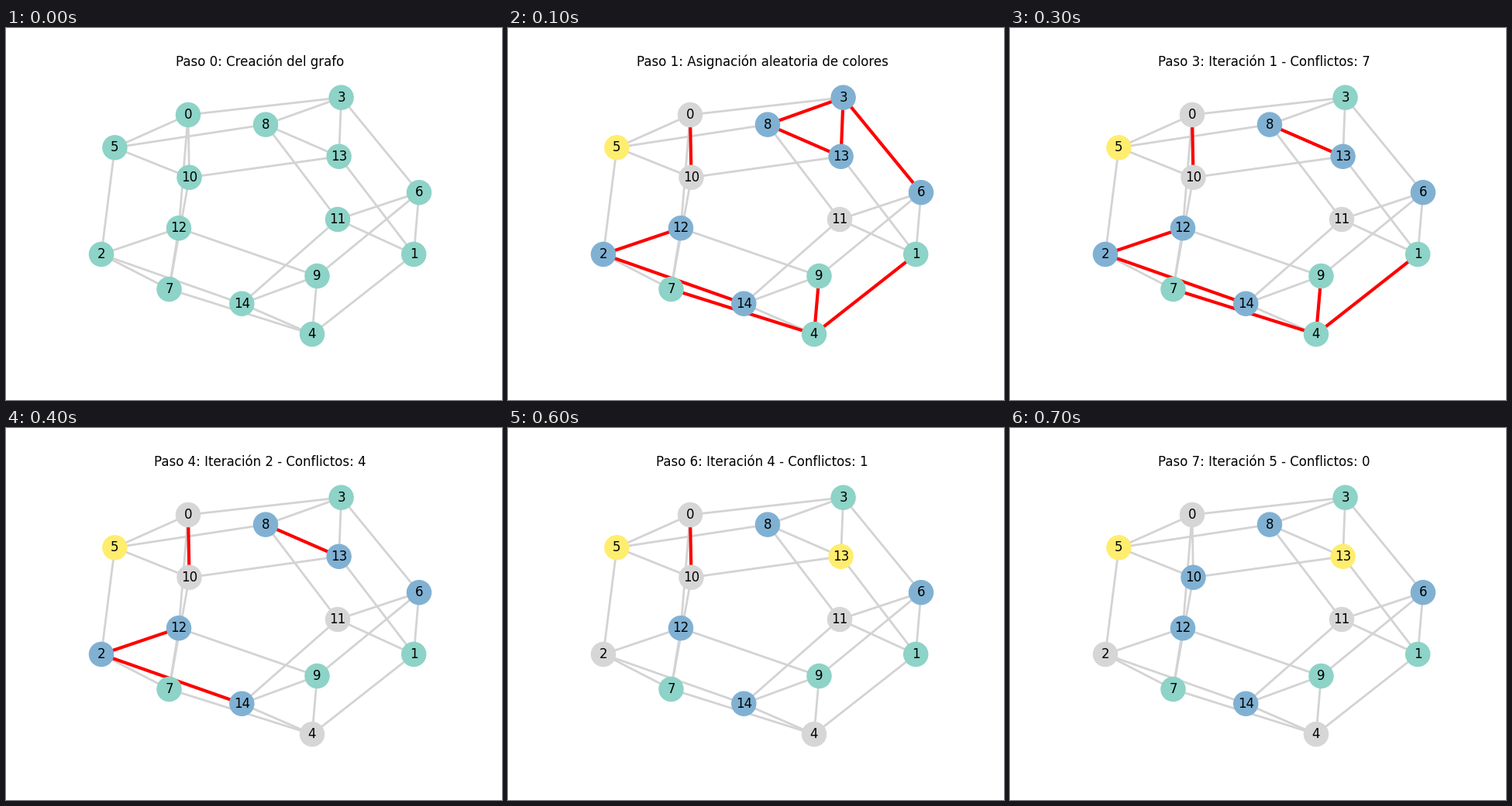
These frames come from a looping animation (640x480 px, 0.8 s). A matplotlib script:

```python
import matplotlib.pyplot as plt
from itertools import product
from matplotlib.animation import FuncAnimation
from matplotlib.collections import LineCollection

TEAL, BLUE, GRAY, YELLOW = PALETTE = "#8dd3c7", "#80b1d3", "#d6d6d6", "#ffed6f"
ITERATIONS = 5
STEPS = 3 + ITERATIONS

# Node centres in stage pixels, y pointing down
NODES = [
    (235, 112), (526.2, 292), (123, 292), (432.6, 89.7), (395, 395.1),
    (140.4, 154.3), (533, 212.2), (210.5, 337), (335, 124.6), (401.5, 320),
    (236.5, 192.8), (428, 247), (223, 258.2), (429.6, 165.8), (304.3, 355.7),
]
# Closed walk that uses every edge of the 4-regular graph once
TOUR = [0, 3, 6, 1, 4, 7, 10, 13, 8, 11, 14, 9, 12, 7, 2,
        5, 0, 10, 5, 8, 3, 13, 1, 11, 6, 9, 4, 14, 2, 12]
EDGES = list(zip(TOUR, TOUR[1:] + TOUR[:1]))


def conflicts(colors):
    return [(a, b) for a, b in EDGES if colors[a] == colors[b]]


def repaired(colors):
    """Make the single recolouring that leaves the fewest conflicts."""
    options = [colors[:node] + [color] + colors[node + 1:]
               for node, color in product(range(len(colors)), PALETTE)]
    return min(options, key=lambda option: len(conflicts(option)))


def first_coloring():
    colors = [BLUE] * len(NODES)
    for color, members in {TEAL: (1, 4, 7, 9), GRAY: (0, 10, 11), YELLOW: (5,)}.items():
        for node in members:
            colors[node] = color
    return colors


def color_history():
    colors = first_coloring()
    history = [[TEAL] * len(NODES), colors, colors]
    for _ in range(ITERATIONS):
        history.append(repaired(history[-1]))
    return history


def caption(step, count):
    if step == 0:
        return "Paso 0: Creación del grafo"
    if step == 1:
        return "Paso 1: Asignación aleatoria de colores"
    if step == 2:
        return f"Paso 2: Conflictos iniciales: {count}"
    return f"Paso {step}: Iteración {step - 2} - Conflictos: {count}"


def segments(edges):
    return [(NODES[a], NODES[b]) for a, b in edges]


plt.rcParams["font.family"] = "DejaVu Sans"
fig = plt.figure(figsize=(6.4, 4.8), dpi=100, facecolor="white")
ax = fig.add_axes([0.125, 0.11, 0.775, 0.77])
ax.set_xlim(80, 576)
ax.set_ylim(427.2, 57.6)
ax.axis("off")
title = ax.set_title("", fontsize=12)

plain_edges = LineCollection([], colors="lightgray", linewidths=2, zorder=1)
bad_edges = LineCollection([], colors="red", linewidths=3, zorder=1.5)
for lines in (plain_edges, bad_edges):
    ax.add_collection(lines, autolim=False)

dots = ax.scatter(*zip(*NODES), s=500, linewidths=1, zorder=2)
for number, (x, y) in enumerate(NODES):
    ax.text(x, y, str(number), fontsize=12, ha="center", va="center", zorder=3)

HISTORY = color_history()


def update(step):
    colors = HISTORY[step]
    clashes = conflicts(colors) if step else []
    dots.set_facecolor(colors)
    dots.set_edgecolor(colors)
    bad_edges.set_segments(segments(clashes))
    plain_edges.set_segments(segments(e for e in EDGES if e not in clashes))
    title.set_text(caption(step, len(clashes)))
    return plain_edges, bad_edges, dots, title


anim = FuncAnimation(fig, update, frames=STEPS, interval=100,
                     repeat=True, repeat_delay=0, blit=False)
plt.show()
```
